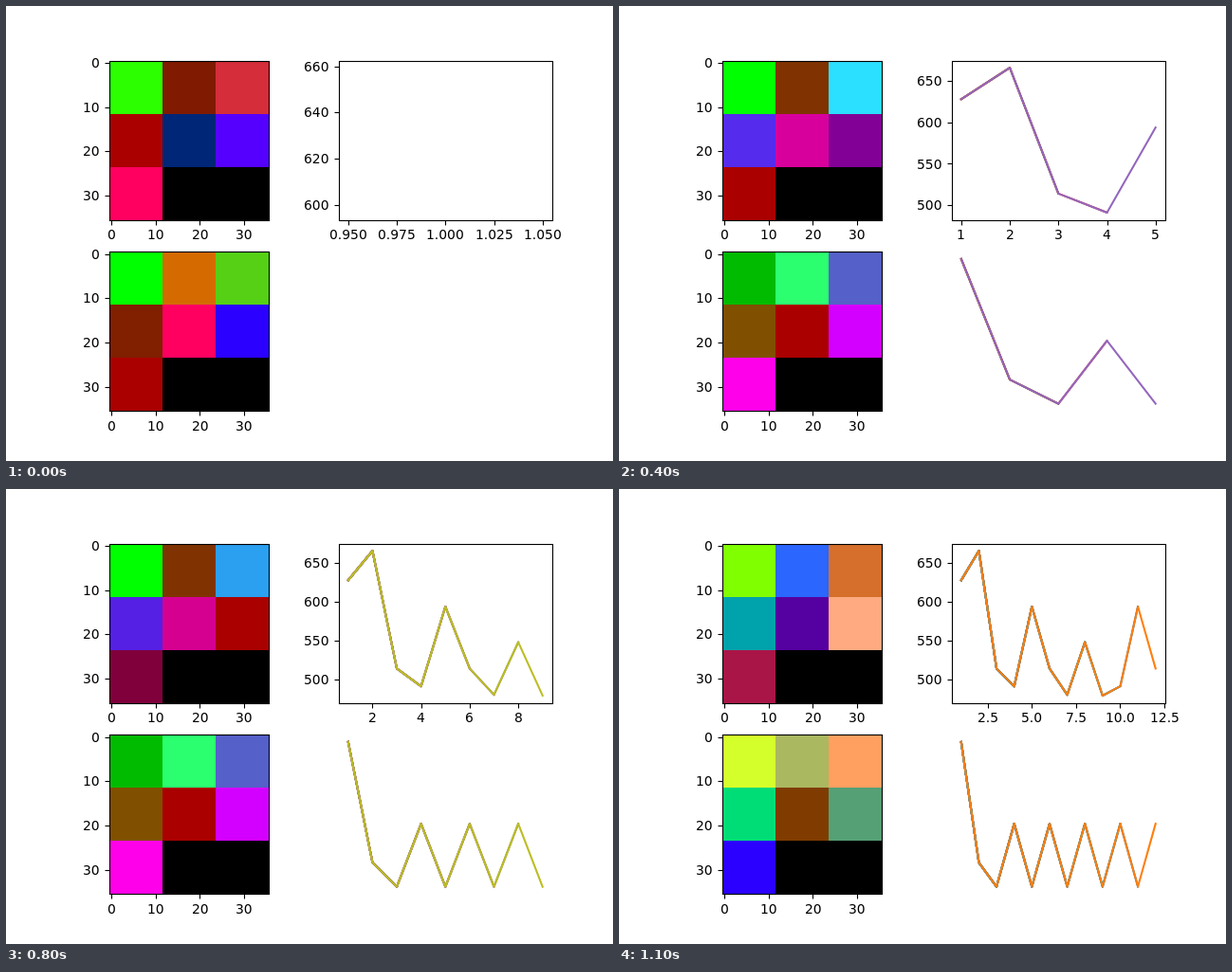
An HTML page with a canvas for the animation above (1.2 s loop, 640 px wide and 480 px high).

```html
<!DOCTYPE html>
<html lang="en">
<head>
<meta charset="utf-8">
<title>Swatches and scores</title>
<style>
  html, body { margin: 0; width: 100%; height: 100%; overflow: hidden; background: #fff; }
  canvas { display: block; }
</style>
</head>
<body>
<canvas id="stage" width="640" height="480"></canvas>
<script>
const ctx = document.getElementById('stage').getContext('2d');
const STEP = 100, COUNT = 12;
const PT = 100 / 72, THIN = 0.8 * PT, THICK = 1.5 * PT, SIZE = 168;
const TOP = 57.6, BOTTOM = 259.2, GRID_X = 108.73, PLOT_X = 350.55, PLOT_W = 225.45;

const cycle = ['#1f77b4', '#ff7f0e', '#2ca02c', '#d62728', '#9467bd',
  '#8c564b', '#e377c2', '#7f7f7f', '#bcbd22', '#17becf'];
const scores = [628, 666, 514, 491, 594, 514, 480, 548, 479, 491, 594, 514];
const errors = scores.map((_, i) => i < 2 ? [1, 0.167][i] : i % 2 ? 0.435 : 0);

// Seven swatches per grid; the last two cells stay black.
const upper = [
  '2bff00 801a00 d52d3a aa0000 002678 5500ff ff0060',
  'd5bb00 801a00 2bff50 5500ff 00466a aa0000 ff0060',
  'd5bb00 803300 2bff50 5500ff 00466a aa0000 ff007a',
  '00ff00 803300 2bd0ff 552bee d8009c aa0000 ff00ea',
  '00ff00 803300 2bdfff 552bee d8009c 820096 aa0000',
  '00ff00 ff637c 2bdfff 552bee d8009c 820096 aa0000',
  '00ff00 aa0000 2bdfff 552bee d8009c ff20ff aa0000',
  '00ff00 aa0000 2b9ff0 5520e4 d50090 ff20ff 80003c',
  '00ff00 803300 2b9ff0 5520e4 d50090 aa0000 80003c',
  '00ff00 803300 2bd0ff 552bee d8009c aa0000 ff00ea',
  '00ff00 803300 2bdfff 552bee d8009c 820096 aa0000',
  '80ff00 2b66ff d56f2b 00a2ab 5500a0 ffaa80 aa1547'
];
const even = '00bb00 2bff6f 5560c8 805000 aa0000 d400ff ff00ea';
const odd = '008800 2bff33 d5461f 803300 aa0000 5500ff ff0073';
const lower = upper.map((_, i) => i % 2 ? odd : even);
lower[0] = '00ff00 d56b00 55d015 802000 ff0060 2b00ff aa0000';
lower[11] = 'd5ff2b aab860 ffa060 00dd77 803c00 55a075 2b00ff';

const snap = v => Math.round(v) + 0.5;

function segment(x1, y1, x2, y2) {
  ctx.beginPath();
  ctx.moveTo(x1, y1);
  ctx.lineTo(x2, y2);
  ctx.stroke();
}

function frame(x, y, w) {
  ctx.strokeStyle = '#000';
  ctx.lineWidth = THIN;
  ctx.lineCap = 'butt';
  ctx.lineJoin = 'miter';
  ctx.strokeRect(snap(x), snap(y), snap(x + w) - snap(x), snap(y + SIZE) - snap(y));
}

function xTick(x, edge, label) {
  segment(snap(x), snap(edge), snap(x), snap(edge) + 5);
  const left = x - ctx.measureText(label).width / 2;
  ctx.fillText(label, Math.round(left), Math.round(edge + 7 * PT + 10.6));
}

function yTick(y, edge, label) {
  segment(snap(edge), snap(y), snap(edge) - 5, snap(y));
  const left = edge - 7 * PT - ctx.measureText(label).width;
  ctx.fillText(label, Math.round(left), Math.round(y + 5.06));
}

function grid(y, swatches) {
  const colors = swatches.split(' '), x0 = Math.round(GRID_X), y0 = Math.round(y);
  for (let i = 0; i < 9; i++) {
    ctx.fillStyle = '#' + (colors[i] || '000000');
    ctx.fillRect(x0 + i % 3 * 56, y0 + Math.floor(i / 3) * 56, 56, 56);
  }
  frame(GRID_X, y, SIZE);
  ctx.fillStyle = '#000';
  for (let v = 0; v < 36; v += 10) {
    const offset = (v + 0.5) * SIZE / 36;
    xTick(GRID_X + offset, y + SIZE, String(v));
    yTick(y + offset, GRID_X, String(v));
  }
}

// Axis limits with a 5% margin; a single value gets widened first.
function limits(lo, hi) {
  if (lo === hi) { const d = Math.abs(lo) * 0.05; lo -= d; hi += d; }
  const pad = (hi - lo) * 0.05;
  return [lo - pad, hi + pad];
}

function ticks([lo, hi], bins, draw) {
  const raw = (hi - lo) / bins, unit = 10 ** Math.floor(Math.log10(raw));
  const step = [1, 2, 2.5, 5, 10].map(m => m * unit).find(s => s >= raw - 1e-9);
  let digits = 0;
  while (Math.abs(step * 10 ** digits - Math.round(step * 10 ** digits)) > 1e-6) digits++;
  for (let k = Math.ceil(lo / step - 1e-9); k * step <= hi + 1e-9; k++)
    draw(k * step, (k * step).toFixed(digits));
}

function plot(y, data, count, boxed) {
  const shown = data.slice(0, count);
  const xs = limits(1, count), ys = limits(Math.min(...shown), Math.max(...shown));
  const px = v => PLOT_X + (v - xs[0]) / (xs[1] - xs[0]) * PLOT_W;
  const py = v => y + (ys[1] - v) / (ys[1] - ys[0]) * SIZE;

  // Each step adds a longer line on top of the earlier ones.
  ctx.lineWidth = THICK;
  ctx.lineCap = 'square';
  ctx.lineJoin = 'round';
  for (let n = 2; n <= count; n++) {
    ctx.strokeStyle = cycle[(n - 1) % cycle.length];
    ctx.beginPath();
    for (let i = 0; i < n; i++) ctx.lineTo(px(i + 1), py(data[i]));
    ctx.stroke();
  }
  if (!boxed) return;
  frame(PLOT_X, y, PLOT_W);
  ctx.fillStyle = '#000';
  ticks(xs, 5, (v, label) => xTick(px(v), y + SIZE, label));
  ticks(ys, 6, (v, label) => yTick(py(v), PLOT_X, label));
}

function draw(i) {
  ctx.fillStyle = '#fff';
  ctx.fillRect(0, 0, 640, 480);
  ctx.font = `${10 * PT}px "DejaVu Sans", sans-serif`;
  grid(TOP, upper[i]);
  grid(BOTTOM, lower[i]);
  plot(TOP, scores, i + 1, true);
  plot(BOTTOM, errors, i + 1, false);
}

const start = performance.now();
let current = 0;
function tick() {
  const i = Math.floor(Math.max(0, performance.now() - start) / STEP) % COUNT;
  if (i !== current) draw(current = i);
  requestAnimationFrame(tick);
}
draw(0);
requestAnimationFrame(tick);
</script>
</body>
</html>
```
